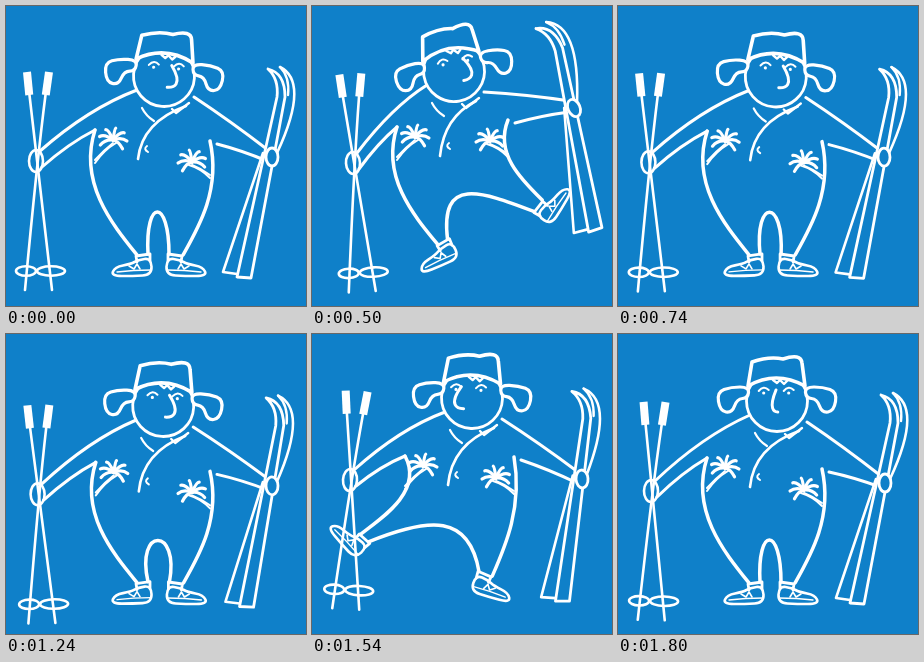
Write an HTML page with a canvas that moves like this. It is 300x300 px and loops after 1.86 s.

```html
<!DOCTYPE html>
<html>
<head>
<meta charset="utf-8">
<style>
html, body { margin: 0; height: 100%; overflow: hidden; background: #0f80c9; }
canvas { display: block; width: 100vw; height: 100vh; }
</style>
</head>
<body>
<canvas id="stage" width="300" height="300"></canvas>
<script>
const ctx = document.getElementById('stage').getContext('2d');
const BLUE = '#0f80c9', LOOP = 1860;

// Joints are [x, y, degrees]; head adds nose position and nose direction.
// seat holds the two control points of the curve between the ankles.
const stand = {
  poles: [30, 155, 0], skis: [266, 151, 0], head: [158, 70, 4, 7, 1],
  footL: [137, 251, 0], footR: [169, 251, 0],
  palmL: [107, 134], palmR: [186, 156], seat: [139, 192, 163, 192]
};
const squat = {
  poles: [34, 168, -2], skis: [266, 153, -3], head: [156, 75, 1, 4, 1],
  footL: [137, 250, 0], footR: [170, 251, 0],
  palmL: [109, 145], palmR: [186, 162], seat: [115, 194, 190, 194]
};
const kickRight = {
  poles: [41, 157, -3], skis: [262, 102, -23], head: [142, 65, -10, 11, 1],
  footL: [132, 238, -22], footR: [228, 202, -60],
  palmL: [103, 131], palmR: [178, 135], seat: [128, 170, 168, 185]
};
const kickLeft = {
  poles: [38, 146, 3], skis: [270, 145, -4], head: [160, 64, 2, -11, -1],
  footL: [51, 206, 50], footR: [172, 242, 15],
  palmL: [111, 132], palmR: [184, 144], seat: [118, 183, 157, 180]
};
const rise = {
  ...stand, poles: [33, 157, 1], skis: [267, 149, 0], head: [159, 67, 0, -1, -.6]
};
const dip = mix(stand, squat, .4);
const settle = mix(stand, squat, .1);

const keys = [
  [0, stand], [200, dip], [320, squat], [380, squat], [500, kickRight], [740, settle],
  [1240, dip], [1380, squat], [1540, kickLeft], [1800, rise], [LOOP, stand]
];
// From each start time on, the picture changes at this interval.
const beats = [[0, 200], [200, 60], [740, 500], [1240, 60], [1300, 80], [1620, 60]];

function mix(a, b, k) {
  const out = {};
  for (const joint in a) out[joint] = a[joint].map((v, i) => v + (b[joint][i] - v) * k);
  return out;
}

function poseAt(time) {
  const [start, interval] = beats.findLast(b => b[0] <= time);
  const t = start + Math.floor((time - start) / interval) * interval;
  const i = keys.findLastIndex(k => k[0] <= t);
  const [t0, a] = keys[i], [t1, b] = keys[i + 1];
  const k = (t - t0) / (t1 - t0);
  return mix(a, b, k * k * (3 - 2 * k));
}

const add = ([x, y], dx, dy) => [x + dx, y + dy];

// A point given in the turned frame of a joint.
function local([x, y, deg], dx, dy) {
  const r = deg * Math.PI / 180, c = Math.cos(r), s = Math.sin(r);
  return [x + dx * c - dy * s, y + dx * s + dy * c];
}

function paint(width, fill) {
  if (fill) ctx.fill();
  ctx.lineWidth = width;
  ctx.stroke();
}

// Two points make a line, three a quadratic and four a cubic curve.
function stroke(width, from, ...rest) {
  ctx.beginPath();
  ctx.moveTo(...from);
  const method = ['lineTo', 'quadraticCurveTo', 'bezierCurveTo'][rest.length - 1];
  ctx[method](...rest.flat());
  paint(width);
}

function poly(width, ...p) {
  ctx.beginPath();
  for (let i = 0; i < p.length; i += 2) ctx.lineTo(p[i], p[i + 1]);
  paint(width);
}

// Closed soft outline that passes the midpoints of its corners.
function blob(width, ...p) {
  const n = p.length;
  ctx.beginPath();
  for (let i = 0; i <= n; i += 2) {
    const x = p[i % n], y = p[(i + 1) % n];
    const mx = (x + p[(i + 2) % n]) / 2, my = (y + p[(i + 3) % n]) / 2;
    if (i) ctx.quadraticCurveTo(x, y, mx, my);
    else ctx.moveTo(mx, my);
  }
  paint(width, true);
}

function oval(x, y, rx, ry, width = 2.6, fill = false) {
  ctx.beginPath();
  ctx.ellipse(x, y, rx, ry, 0, 0, 7);
  paint(width, fill);
}

function place([x, y, deg = 0], draw, flip = 1) {
  ctx.save();
  ctx.translate(x, y);
  ctx.rotate(deg * Math.PI / 180);
  ctx.scale(flip, 1);
  draw();
  ctx.restore();
}

function poles() {
  for (const [top, bottom, basket] of [[-9, 16, 14], [13, -11, 10]]) {
    stroke(2.6, [top * .75, -68], [1, 0], [bottom, 129]);
    ctx.lineCap = 'butt';
    stroke(8, [top, -89], [top * .75, -66]);
    ctx.lineCap = 'round';
    oval(bottom - Math.sign(bottom), 110, basket, 4.7);
  }
  oval(0, 0, 7, 11);
}

function skis() {
  stroke(2.6, [8, -90], [38, -75], [5, -4]);
  stroke(2.4, [8, -90], [18, -80], [16, -62]);
  poly(2.6, -9, -4, -49, 115, -35, 117);
  ctx.beginPath();
  ctx.moveTo(-4, -88);
  ctx.quadraticCurveTo(7, -78, 5, -60);
  ctx.lineTo(-35, 120);
  ctx.lineTo(-21, 121);
  ctx.lineTo(13, -60);
  ctx.quadraticCurveTo(13, -84, -4, -88);
  paint(2.8, true);
  oval(0, 0, 6, 9, 2.8, true);
}

function shoe() {
  blob(2.6, 8, 1, 9, 18, -10, 19, -32, 19, -28, 10, -12, 7, -5, 3);
  poly(2.8, -6, 5, -7, -1, 7, -3, 7, 4);
  poly(1.6, -14, 9, -9, 12, -6, 7, -3, 12);
  stroke(1.3, [-26, 15], [-10, 13], [8, 13]);
}

function palm(trunkX, trunkY) {
  for (let i = 0; i < 7; i++) {
    const a = (i * 42 - 205) * Math.PI / 180;
    const x = 14 * Math.cos(a), y = 12 * Math.sin(a);
    stroke(3.2, [0, 0], [x * .6, y * .6 - 4], [x, y]);
  }
  for (const gap of [0, 3]) stroke(2, [gap, 3], [trunkX / 2, trunkY / 2], [trunkX, trunkY + gap]);
}

function head([, , , nose, dir]) {
  oval(0, 0, 30.5, 30.5, 2.8, true);
  for (const side of [-1, 1]) {
    place([0, 0], () => blob(3.2, 28, -14, 46, -14, 60, -9, 57, 10, 45, 12, 40, -2, 29, -3), side);
  }
  ctx.beginPath();
  ctx.moveTo(-29, -15);
  ctx.lineTo(-25, -39);
  ctx.quadraticCurveTo(-8, -45, 6, -42);
  ctx.quadraticCurveTo(24, -48, 25, -38);
  ctx.lineTo(28, -15);
  ctx.quadraticCurveTo(-1, -31, -29, -15);
  paint(3.6, true);
  poly(2.4, -4, -21, 0, -18, 3, -21, 7, -17, 10, -20);
  for (const eye of [-13, 12]) {
    const x = eye + nose * .3;
    stroke(2, [x - 5, -10], [x, -16], [x + 5, -11]);
    oval(x, -8, .8, .8, 1.6);
  }
  stroke(3, [nose, -11], [nose + 13 * dir, 8], [nose + 3 * dir, 11], [nose - 3 * dir, 11]);
}

function shirt(head, palmL) {
  const top = add(head, 22, 30), hem = add(palmL, 25, 19);
  stroke(2.6, top, [hem[0] + 4, top[1] + 16], hem);
  stroke(2.2, add(head, -22, 32), add(head, -18, 40), add(head, -10, 45));
  const [x, y] = top;
  poly(2.4, x - 14, y + 3, x - 10, y + 7, x + 3, y - 3);
  const [bx, by] = add(hem, 8, -10);
  stroke(2, [bx + 1, by - 3], [bx - 3, by], [bx + 2, by + 3]);
}

function side(armpit, ankle) {
  const dx = ankle[0] - armpit[0], dy = ankle[1] - armpit[1];
  stroke(3.5, armpit, add(armpit, -.4 * dx, .42 * dy), add(ankle, -.6 * dx, -.25 * dy), ankle);
}

function arm(shoulder, hand, bow) {
  const mid = [(shoulder[0] + hand[0]) / 2, (shoulder[1] + hand[1]) / 2];
  stroke(3, shoulder, add(mid, 0, bow), hand);
}

function draw({ poles: handL, skis: handR, head: face, footL, footR, palmL, palmR, seat }) {
  ctx.fillStyle = BLUE;
  ctx.fillRect(0, 0, 300, 300);
  ctx.strokeStyle = '#fff';
  ctx.lineCap = ctx.lineJoin = 'round';

  const armpit = add(palmL, -18, -10);
  arm(add(face, -27, 14), add(handL, 4, -10), -12);
  arm(armpit, add(handL, 6, 6), -5);
  arm(add(face, 30, 21), add(handR, -4, -7), -2);
  arm(add(palmR, 25, -18), add(handR, -5, 4), -2);
  side(armpit, local(footL, -6, -2));
  side(add(palmR, 18, -21), local(footR, 8, -2));
  stroke(3.5, local(footL, 5, -3), seat.slice(0, 2), seat.slice(2), local(footR, -6, -3));
  shirt(face, palmL);
  place(palmL, () => palm(-18, 20));
  place(palmR, () => palm(-18, 13), -1);
  place(footL, shoe);
  place(footR, shoe, -1);
  place(handL, poles);
  place(handR, skis);
  place(face, () => head(face));
}

const start = performance.now();
function tick() {
  draw(poseAt((performance.now() - start) % LOOP));
  requestAnimationFrame(tick);
}
tick();
</script>
</body>
</html>
```
